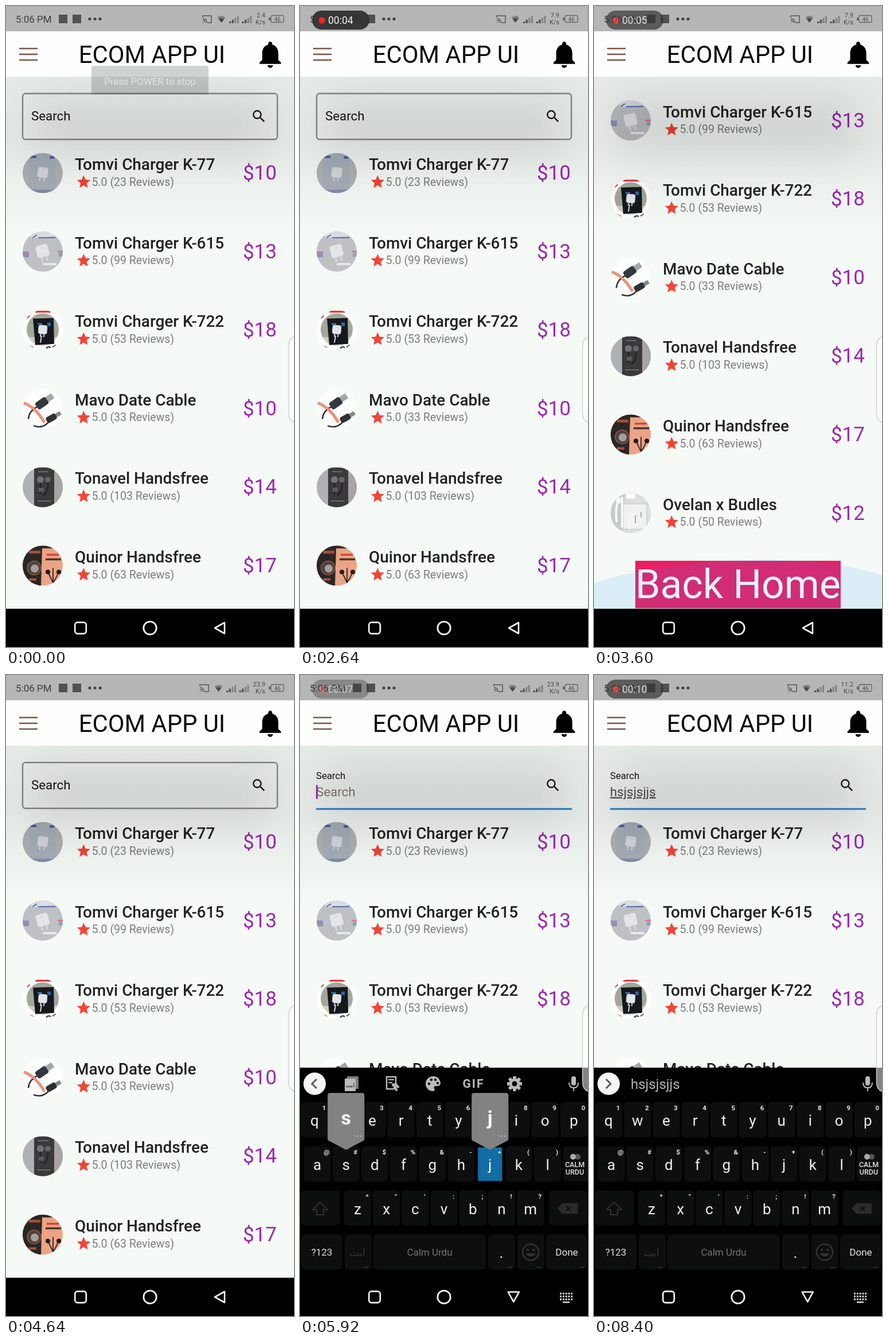
These frames come from a looping animation (502 px wide and 1115 px high, 8.48 s). An HTML page:

```html
<!DOCTYPE html>
<html lang="en">
<head>
<meta charset="utf-8">
<title>Shop app</title>
<style>
html, body { margin: 0; width: 100%; height: 100%; overflow: hidden; background: #f5faf7; }
svg { display: block; width: 100%; height: 100%; font-family: Roboto, sans-serif; }
text { white-space: pre; }
</style>
</head>
<body>
<svg id="stage" viewBox="0 0 502 1115"></svg>
<script>
const LOOP = 8480, STEP = 80, PITCH = 136.6, KEY = 50.2, SCROLL = 228;
const svg = document.getElementById('stage');

const text = (x, y, s, size, fill, more = '') =>
  `<text x="${x}" y="${y}" font-size="${size}" fill="${fill}" ${more}>${s}</text>`;
const mid = (x, y, s, size, fill, more = '') => text(x, y, s, size, fill, 'text-anchor="middle" ' + more);
const rect = (x, y, w, h, fill, more = '') =>
  `<rect x="${x}" y="${y}" width="${w}" height="${h}" fill="${fill}" ${more}/>`;
const circle = (x, y, r, fill, more = '') => `<circle cx="${x}" cy="${y}" r="${r}" fill="${fill}" ${more}/>`;
const path = (d, fill, more = '') => `<path d="${d}" fill="${fill}" ${more}/>`;
const line = (d, color, w, more = '') => path(d, 'none', `stroke="${color}" stroke-width="${w}" ${more}`);
const group = (id, body, more = '') => `<g id="${id}" ${more}>${body}</g>`;

const STAR = 'M12 17.27L18.18 21l-1.64-7.03L22 9.24l-7.19-.61L12 2 9.19 8.63 2 9.24l5.46 4.73L5.82 21z';
const LENS = 'M15.5 14h-.79l-.28-.27A6.47 6.47 0 0 0 16 9.5 6.5 6.5 0 1 0 9.5 16c1.61 0 3.09-.59 4.23-1.57l.27.28v.79l5 4.99L20.49 19l-4.99-5zm-6 0C7.01 14 5 11.99 5 9.5S7.01 5 9.5 5 14 7.01 14 9.5 11.99 14 9.5 14z';
const BELL = 'M12 22c1.1 0 2-.9 2-2h-4c0 1.1.89 2 2 2zm6-6v-5c0-3.07-1.64-5.64-4.5-6.32V4c0-.83-.67-1.5-1.5-1.5s-1.5.67-1.5 1.5v.68C7.63 5.36 6 7.92 6 11v5l-2 2v1h16v-1l-2-2z';

// Product thumbnails, drawn around their own centre
const charger = (tilt, s) => `<g transform="rotate(${tilt}) scale(${s})">` +
  rect(-10, -11, 20, 20, '#e3e6e9', 'rx="4" stroke="#c3c8cd"') +
  line('M-4 9v7M4 9v7M-2 -6h5', '#d9dcdf', 2.5) + '</g>';
const thumbs = [
  rect(-35, -35, 70, 70, '#b0b2b3') + rect(-24, -33, 47, 68, '#a6afb9') + rect(-24, 29, 47, 6, '#848dab') +
    rect(-22, -30, 11, 4, '#4a5da3') + rect(12, -29, 8, 4, '#4a5da3') +
    `<g opacity=".75">${charger(8, .9)}</g>`,
  rect(-35, -35, 70, 70, '#bfc0c3') + path('M-20 -35H25V-27L-20 -23z', '#dcdde3') +
    line('M-18 -24L-10 -29M-8 -24H22', '#5f70b2', 2) + rect(-35, 0, 11, 10, '#8494c4') +
    line('M-34 6h9M26 0h9', '#d0777f', 2.5) + rect(28, 2, 7, 7, '#8f9cc6') + charger(-14, 1.1) +
    line('M0 22h24', '#e8e8e8', 4),
  rect(-35, -35, 70, 70, '#fff') + circle(0, -1, 28, '#a3a79b') + path('M-25 12H25Q17 27 0 27T-25 12z', '#d0ccc2') +
    path('M-17 -20L19 -21 20 24 -13 26z', '#15181d') + rect(8, -13, 6, 6, '#2c68ad') + rect(-9, -12, 8, 3, '#3976b7') +
    charger(5, .75) + line('M-2 10l-2 12', '#ddd', 2) + line('M-13 -32h27M-28 -21l5 -5M-27 26l10 5', '#dc4040', 3.5) +
    line('M6 32q4 -5 8 -1m3 -1l6 -4', '#4a4a4a', 2.5),
  rect(-35, -35, 70, 70, '#fff', 'opacity=".7"') +
    line('M-25 18Q-24 4 -10 -3M-16 30Q2 36 12 21', '#33363a', 2.6) +
    line('M-33 -10Q-12 -2 3 24', '#e9785f', 4.5) + line('M-33 -10Q-12 -2 3 24', '#f5a692', 1.5) +
    `<g transform="translate(1 -11) rotate(-35)">${rect(-14, -7, 22, 14, '#34373b', 'rx="4"')}${rect(8, -5, 12, 10, '#a4a6a9')}</g>` +
    `<g transform="translate(17 15) rotate(-30)">${rect(-12, -5, 19, 11, '#2e3135', 'rx="4"')}${rect(7, -3, 9, 7, '#85878a')}</g>`,
  rect(-35, -35, 70, 70, '#b1b0b5') + rect(19, -35, 16, 70, '#a8a4a3') + rect(-15, -34, 35, 69, '#3a393b') +
    circle(-4, -13, 6, '#737377') + circle(9, -13, 5, '#66666a') + line('M-4 -8V12M9 -8Q10 10 0 14', '#232325', 2.5) +
    rect(-7, 1, 9, 7, '#5b5b60') + line('M-10 24H14M-8 -27H10', '#68666c', 2),
  rect(-35, -35, 70, 70, '#eba485') + path('M-35 -35H28V-30H-1L-3 35H-35z', '#2b2625') +
    rect(-24, -26, 20, 5, '#a14e3b') + circle(-15, 4, 12, '#4a4341', 'stroke="#9a5640" stroke-width="1.5"') +
    circle(-14, 5, 7, '#a39e9c') + rect(-24, 22, 13, 4, '#a9523b') +
    line('M7 -19h21', '#cf4934', 3.5) + line('M5 -11h27', '#4b342d', 3.5) +
    line('M10 13Q15 23 18 30V4M18 30Q23 23 27 12', '#2b2221', 1.8) + circle(9, 11, 4, '#211c1c') + circle(28, 11, 4, '#211c1c'),
  rect(-35, -35, 70, 70, '#dededb') + path('M-35 -35H-10L-16 35H-35z', '#c9cac8') +
    rect(-13, -16, 41, 44, '#f1f1ef', 'stroke="#c1c1bf"') +
    line('M-22 -24Q-28 0 -24 16M-15 -28V25M-2 28Q-3 0 6 2V26M18 -3V18', '#f6f6f5', 4) +
    line('M8 4v14M18 -2v10', '#aaaaa8', 2) + rect(-8, -34, 16, 9, '#fff', 'rx="3"') + circle(-21, -22, 5, '#f7f7f7')
];

const items = [
  ['Tomvi Charger K-77', 23, 10], ['Tomvi Charger K-615', 99, 13], ['Tomvi Charger K-722', 53, 18],
  ['Mavo Date Cable', 33, 10], ['Tonavel Handsfree', 103, 14], ['Quinor Handsfree', 63, 17], ['Ovelan x Budles', 50, 12]
];
const row = ([name, reviews, price], i) => `<g transform="translate(0 ${i * PITCH})">` +
  `<g transform="translate(64 290.5)" clip-path="url(#disc)">${thumbs[i]}</g>` +
  text(120, 285, name, 27.9, '#202221', 'font-weight="500"') +
  path(STAR, '#f44336', 'transform="translate(121.4 292) scale(1.16)"') +
  text(149.5, 312.5, `5.0 (${reviews} Reviews)`, 19.5, '#7b7e7d') +
  text(413, 302, '$' + price, 34.9, '#9c27b0') + '</g>';

const content = group('content',
  rect(29, 152.3, 444, 79.7, 'none', 'id="outline" rx="5" stroke="#8a8d8b" stroke-width="2.4"') +
  rect(28, 231.5, 446, 3, '#2a86cf', 'id="underline"') +
  text(44, 199, 'Search', 22.3, '#151515', 'id="label"') +
  text(28, 210.5, 'Search', 22.3, '#8b766c', 'id="hint"') +
  text(28, 210.5, '', 22.3, '#474a49', 'id="typed" text-decoration="underline"') +
  rect(28, 191.5, 2.8, 24, '#9c27b0', 'id="cursor"') +
  path(LENS, '#151515', 'transform="translate(426.5 177.5) scale(1.2)"') +
  items.map(row).join('') +
  rect(72, 1193, 358, 82.5, '#e91e63') + text(72, 1257.7, 'Back Home', 69.7, '#fff') +
  path('M0 1231C150 1185 380 1176 502 1218V1278H0z', '#2196f3', 'opacity=".12"'));

const shade = rect(0, 123, 502, 280, 'url(#fade)') +
  rect(45, 155, 412, 105, '#000', 'opacity=".075" filter="url(#soft)"');

const appBar = rect(0, 44, 502, 79, '#fdfefd') +
  line('M23 74H55M23 84H55M23 94H55', '#795548', 2.6) +
  text(126.8, 98.5, 'ECOM APP UI', 41.8, '#090909') +
  path(BELL, '#000', 'transform="translate(432.5 56.2) scale(2.34)"');

const bars = x => [0, 1, 2, 3].map(i =>
  rect(x + i * 4.6, 27 - i * 3.2, 3.2, 3 + i * 3.2, i < 2 ? '#505050' : '#858585')).join('');
const statusBar = rect(0, 0, 502, 44, '#b6b6b6') +
  text(17, 28.5, '5:06 PM', 17, '#3f3f3f') +
  rect(92, 15, 15, 15, '#515151') + rect(116, 15, 15, 15, '#515151') +
  [146, 155, 164].map(x => circle(x, 22.5, 2.6, '#444')).join('') +
  group('signals',
    line('M343 20V17H358V29H351M343 29h1M343 25q4 0 4 4M343 22q7 0 7 7', '#555', 1.5) +
    path('M368.5 20Q375.5 14 382.5 20L375.5 29z', '#808080') + path('M371 23Q375.5 19 380 23L375.5 29z', '#4b4b4b') +
    bars(389) + bars(411.5)) +
  text(452, 20, '', 11, '#484848', 'id="speed" text-anchor="end"') +
  text(452, 32, 'K/s', 11, '#484848', 'text-anchor="end"') +
  rect(462, 16.5, 22, 12, 'none', 'rx="2.5" stroke="#666" stroke-width="1.3"') + rect(458, 20, 3, 5, '#666') +
  mid(473, 26.5, '46', 10, '#505050') +
  group('pill', rect(21, 8, 100, 33, '#333', 'rx="16.5" opacity=".96"') + circle(38, 25, 5.5, '#f32525') +
    text(49, 31, '', 17.5, '#f2f2f2', 'id="clock"'));

const toast = group('toast', rect(149, 44, 204, 50, '#2d363a', 'rx="4" opacity=".78"') +
  mid(251, 76.5, 'Press POWER to stop', 16.8, '#e6e9e9'));

const navBar = rect(0, 1048.5, 502, 67, '#000') +
  rect(120.2, 1072.2, 19.6, 19.6, 'none', 'rx="4.5" stroke="#f4f4f4" stroke-width="2.7"') +
  circle(251, 1082, 11.2, 'none', 'stroke="#f4f4f4" stroke-width="2.8"') +
  path('M381 1072.5V1091.5L364 1082z', 'none', 'id="back" stroke="#f4f4f4" stroke-width="2.6" stroke-linejoin="round"') +
  group('switcher', line('M453 1076h22M453 1081h22M453 1086h22', '#ddd', 3, 'stroke-dasharray="3 1.8"') +
    line('M458 1091h12', '#ddd', 2.5));

// Keyboard
const cap = (x, y, w) => rect(x, y, w, 61, '#0d0f0e', 'rx="6"');
const rows = [
  { x: 25.5, y: 743, keys: 'qwertyuiop', alt: '1234567890' },
  { x: 30, y: 820, keys: 'asdfghjkl', alt: '@#$%&-+()' },
  { x: 100.5, y: 896.5, keys: 'zxcvbnm', alt: '*"\':;!?' }
];
const esc = c => c === '&' ? '&amp;' : c;
const letters = ({ x, y, keys, alt }) => [...keys].map((k, i) => {
  const cx = x + i * KEY;
  return cap(cx - 23.5, y, 47) + mid(cx, y + 41, k, 26, '#f0f0f0') +
    mid(cx + 16.5, y + 14, esc(alt[i]), 11.5, '#e2e2e2', 'font-weight="700"');
}).join('');
const keyX = k => rows[1].x + rows[1].keys.indexOf(k) * KEY;
const popup = k => {
  const x = keyX(k);
  return group('lit-' + k, rect(x - 21, 822, 42, 58, '#126ca5') + mid(x, 861, k, 26, '#fff') +
      mid(x + 16.5, 834, k === 'j' ? '+' : k === 'h' ? '-' : '#', 11.5, '#fff')) +
    group('pop-' + k, path(`M${x - 32} 731q0 -4 4 -4h56q4 0 4 4V809L${x} 826 ${x - 32} 809z`, '#818383') +
      mid(x, 782, k, 34, '#fff', 'font-weight="700"') + mid(x + 21, 803, '...', 18, '#ccc'));
};
const gray = '#b9bbba';
const gear = [0, 45, 90, 135].map(a => rect(-2.8, -13, 5.6, 26, gray, `transform="rotate(${a})"`)).join('');
const tools = group('tools',
  rect(82, 698, 20, 22, '#7a7c7b') + rect(78, 702, 19, 22, gray) + mid(87.5, 717, 'ابت', 10, '#111') +
  rect(151, 699, 16, 21, 'none', `stroke="${gray}" stroke-width="2.5"`) + line('M154 704h10M154 709h7', gray, 2) +
  line('M161 711l8 12M165 710l7 8', gray, 4) +
  path('M232 698a13 13 0 1 0 0 26q4 -1 2 -5t4 -4h3q4 -1 4 -5q-2 -12 -13 -12z', gray) +
  [[225, 711], [229, 704], [236, 704], [240, 710]].map(([x, y]) => circle(x, y, 2.2, '#000')).join('') +
  mid(302.5, 718, 'GIF', 21, gray, 'font-weight="700" letter-spacing="2"') +
  `<g transform="translate(374 711)">${gear}${circle(0, 0, 9.5, gray)}${circle(0, 0, 4.5, '#000')}</g>`);

const keyboard = group('keyboard', rect(0, 683, 502, 366, '#000') +
  circle(25.5, 711, 19.5, '#f5f5f5') +
  path('', 'none', 'id="chevron" stroke="#5b5d5c" stroke-width="3"') + tools +
  text(64, 720, '', 24, '#b3b5b4', 'id="suggest"') +
  rect(473, 698, 8, 16, gray, 'rx="4"') + line('M469 709q0 9 8 9t8 -9M477 718v6', gray, 2) +
  rows.map(letters).join('') +
  cap(459, 820, 46) + circle(484, 838, 5, '#555') + circle(476, 838, 5, '#aaa') +
  mid(479, 856, 'CALM', 12.5, '#e5e5e5', 'font-weight="500"') + mid(479, 869, 'URDU', 12.5, '#e5e5e5', 'font-weight="500"') +
  cap(2, 896.5, 67) + line('M35 917l-13 13h7v9h12v-9h7z', '#2d302f', 2) +
  cap(434, 896.5, 66) + path('M449 928l8 -9h27v18h-27z', '#292c2b') + line('M464 924l8 8M472 924l-8 8', '#0d0f0e', 2) +
  cap(2, 973, 72) + mid(38, 1010, '?123', 17, '#dedede') +
  cap(78, 973, 47) + mid(100, 1011, 'ابت', 18, '#303332', 'font-family="DejaVu Sans, sans-serif"') +
  cap(128, 973, 196) + mid(226, 1010, 'Calm Urdu', 17, '#727473') +
  cap(328, 973, 47) + mid(351, 1014, '.', 26, '#eee') +
  cap(379, 973, 47) + circle(402, 1004, 14, 'none', 'stroke="#303332" stroke-width="2.5"') +
  circle(397, 1000, 2.2, '#303332') + circle(407, 1000, 2.2, '#303332') + path('M393 1006h18q-9 11 -18 0z', '#303332') +
  cap(429, 973, 71) + mid(465, 1010, 'Done', 17, '#e5e5e5') +
  [115, 366, 416, 491].map(x => mid(x, 1031, '...', 11, '#999')).join('') +
  [...'hsj'].map(popup).join(''));

const handle = path('M504 575Q492.5 577 492.5 592V708Q492.5 722 504 725z', '#fff', 'fill-opacity=".52" stroke="#cdd0cf" stroke-width="1.4"');

svg.innerHTML = `<defs>
  <clipPath id="disc"><circle r="35"/></clipPath>
  <filter id="soft" x="-40%" y="-120%" width="180%" height="340%"><feGaussianBlur stdDeviation="32"/></filter>
  <linearGradient id="fade" x2="0" y2="1">
    <stop offset="0" stop-opacity=".065"/><stop offset=".4" stop-opacity=".075"/>
    <stop offset=".7" stop-opacity=".035"/><stop offset="1" stop-opacity="0"/>
  </linearGradient></defs>` +
  rect(0, 0, 502, 1115, '#f5faf7') + content + shade + appBar + statusBar + toast + keyboard + handle + navBar;

const el = {};
svg.querySelectorAll('[id]').forEach(n => el[n.id] = n);
const set = (id, attrs) => Object.entries(attrs).forEach(([k, v]) => el[id].setAttribute(k, v));
const show = (id, on) => set(id, { opacity: +on });
const say = (id, s) => { if (el[id].textContent !== s) el[id].textContent = s; };
const ramp = (t, a, b) => Math.min(1, Math.max(0, (t - a) / (b - a)));
const ease = p => 1 - (1 - p) ** 3;

const WORD = 'hsjsjsjjs', PRESS = 5680, GAP = 110, HOLD = 200, LAG = 340;

function draw(t) {
  const scroll = SCROLL * (ease(ramp(t, 2700, 3200)) - ease(ramp(t, 3660, 4320)));
  set('content', { transform: `translate(0 ${-scroll})` });

  const rise = ease(ramp(t, 0, 480));
  set('toast', { transform: `translate(0 ${60 * (1 - rise)})`, opacity: (.28 + .72 * rise) * (1 - ramp(t, 1920, 2320)) });

  // Recording clock pulses in and out
  const beat = (t + 160) % 1200;
  set('pill', { opacity: t < 1000 ? 0 : ramp(beat, 0, 220) * (1 - ramp(beat, 400, 680)) });
  say('clock', '00:' + String(Math.floor((t + 1750) / 1000)).padStart(2, '0'));

  const speed = t < 2480 ? '2.4' : t < 3920 ? '7.9' : t < 6400 ? '23.9' : '11.2';
  say('speed', speed);
  set('signals', { transform: `translate(${speed.length > 3 ? -5 : 0} 0)` });

  // Search field
  const focus = ease(ramp(t, 4960, 5160)), typedCount = Math.floor((t - PRESS - LAG) / GAP) + 1;
  const typed = WORD.slice(0, Math.max(0, typedCount));
  show('outline', focus === 0);
  show('underline', focus > 0);
  set('label', { x: 44 - 16 * focus, y: 199 - 18 * focus, 'font-size': 22.3 - 5.6 * focus });
  set('hint', { opacity: typed ? 0 : focus });
  say('typed', typed);
  say('suggest', typed);
  show('cursor', focus > 0 && (t + 100) % 1000 < 500);
  set('cursor', { x: 28 + (typed ? el.typed.getComputedTextLength() : 0) });

  // Keyboard and navigation bar
  const up = ease(ramp(t, 5280, 5600));
  set('keyboard', { transform: `translate(0 ${366 * (1 - up)})`, opacity: +(up > 0) });
  show('switcher', t >= 5200);
  set('back', { transform: t >= 5200 ? 'rotate(-90 372.3 1082)' : '' });
  show('tools', !typed);
  set('chevron', { d: typed ? 'M21 703l8 8 -8 8' : 'M29 703l-8 8 8 8' });
  for (const k of 'hsj') {
    let pop = false, lit = false;
    [...WORD].forEach((c, i) => {
      const age = t - PRESS - i * GAP;
      if (c !== k || age < 0) return;
      pop = pop || age < HOLD;
      lit = lit || age < GAP;
    });
    show('pop-' + k, pop);
    show('lit-' + k, lit);
  }
}

function tick(now) {
  draw(Math.floor((now % LOOP) / STEP) * STEP);
  requestAnimationFrame(tick);
}
draw(0);
requestAnimationFrame(tick);
</script>
</body>
</html>
```
